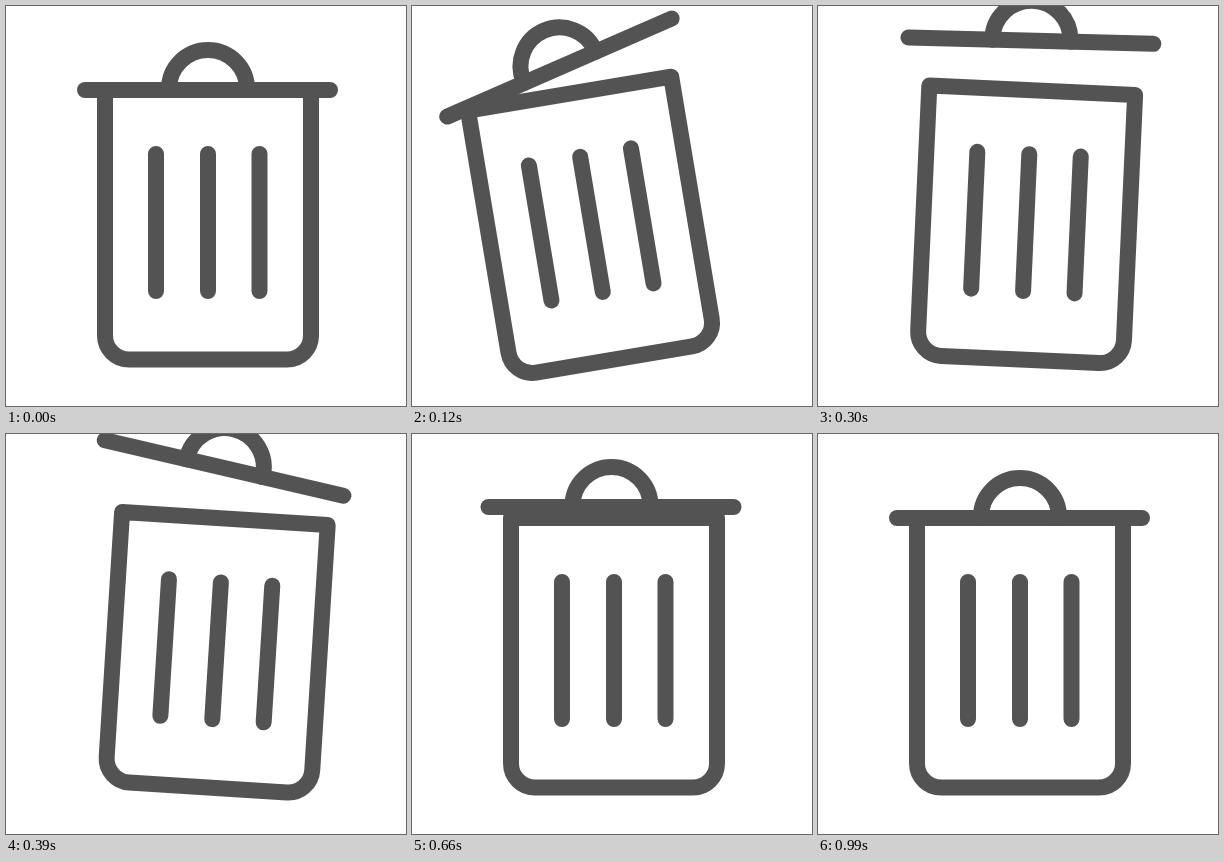
Write an HTML page that moves like this. It is 400 px wide and 400 px high and loops after 3020 ms.

```html
<!DOCTYPE html>
<html lang="en">
<head>
<meta charset="utf-8">
<title>Trash can</title>
<style>
  html, body { margin: 0; width: 100%; height: 100%; overflow: hidden; background: #fff; }
  svg { display: block; width: 100%; height: 100%; }
  g { fill: none; stroke: #535353; stroke-width: 16; stroke-linecap: round; stroke-linejoin: round; }
</style>
</head>
<body>
<svg viewBox="0 0 400 400">
  <g id="can">
    <path d="M99 84H305V329.5A24 24 0 0 1 281 353.5H123A24 24 0 0 1 99 329.5Z"/>
    <path d="M150 148V285M202 148V285M253.5 148V285"/>
    <g id="lid">
      <path d="M79 84H324"/>
      <path d="M163 84V83A39 39 0 0 1 241 83V84"/>
    </g>
  </g>
</svg>
<script>
const LOOP = 3020, STEP = 30, ACTIVE = 990;
const can = document.getElementById('can');
const lid = document.getElementById('lid');

// Each track lists [time in ms, value]; the lid moves relative to the can.
const tilt = track([[0, 0], [60, -6.6], [120, -9.5], [150, -10], [215, -10], [240, -7.8],
                    [328, 5], [390, 3.6], [480, 1.15], [540, 0.35], [640, 0]]);
const lidTilt = track([[0, 0], [60, -10], [120, -14.1], [150, -14.5], [240, -8.7],
                       [390, 9.5], [450, 11.1], [480, 10.75], [640, 0]]);
const lidX = track([[0, 0], [60, -2.2], [120, -5.2], [240, -3], [390, -3.5],
                    [480, -7.6], [540, -6.5], [660, -2.5], [ACTIVE, 0]]);
const lidY = track([[0, 0], [60, -18], [120, -27.5], [240, -44.4], [350, -51.5],
                    [390, -50.4], [480, -38.2], [660, -11], [ACTIVE, 0]]);

// Smooth curve through the keys that never overshoots them.
function track(keys) {
  const rise = keys.slice(1).map(([t, v], i) => (v - keys[i][1]) / (t - keys[i][0]));
  const slope = keys.map((_, i) => {
    const a = rise[i - 1], b = rise[i];
    if (a === undefined) return b;
    if (b === undefined) return 0;
    return a * b > 0 ? 2 * a * b / (a + b) : 0;
  });
  return time => {
    const i = keys.findIndex(([t]) => t > time) - 1;
    if (i < 0) return keys[keys.length - 1][1];
    const [t0, v0] = keys[i], [t1, v1] = keys[i + 1];
    const span = t1 - t0, u = (time - t0) / span, w = 1 - u;
    return w * w * ((1 + 2 * u) * v0 + u * span * slope[i]) +
           u * u * ((1 + 2 * w) * v1 - w * span * slope[i + 1]);
  };
}

function draw(now) {
  const time = Math.min(ACTIVE, Math.floor((now % LOOP + 1) / STEP) * STEP);
  can.setAttribute('transform', `rotate(${tilt(time)} 202 353)`);
  lid.setAttribute('transform',
    `translate(${lidX(time)} ${lidY(time)}) rotate(${lidTilt(time)} 201.5 84)`);
}

const start = performance.now();
function tick() {
  draw(performance.now() - start);
  requestAnimationFrame(tick);
}
tick();
</script>
</body>
</html>
```
